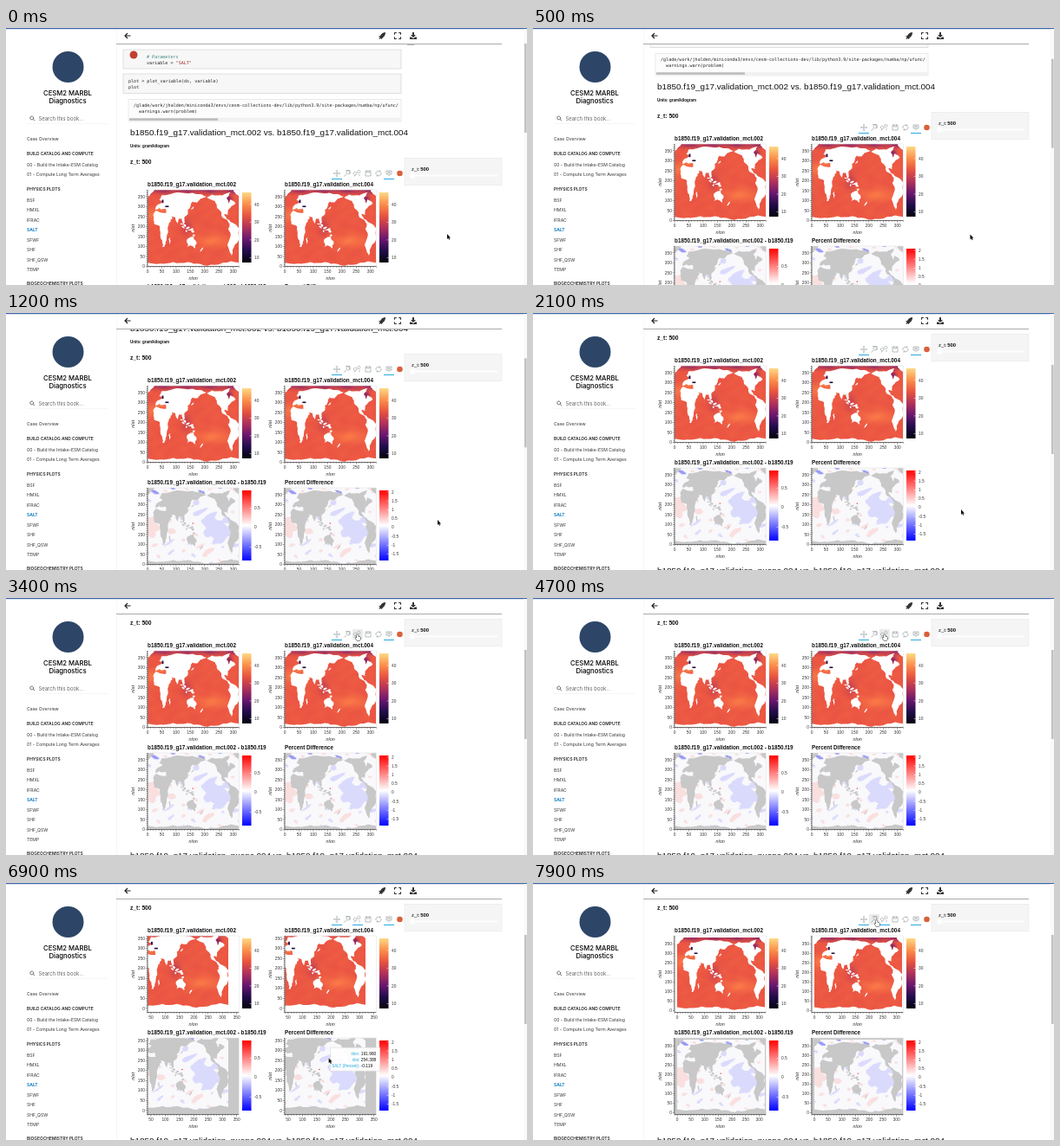
An HTML page with a canvas that plays this animation: 600x297 px, repeating every 8 s.

```html
<!DOCTYPE html>
<html lang="en">
<meta charset="utf-8">
<title>Diagnostics notebook</title>
<style>
  html, body { margin: 0; width: 100%; height: 100%; overflow: hidden; background: #fff; }
  canvas { display: block; }
</style>
<canvas id="stage" width="600" height="297"></canvas>
<script>
const c = document.getElementById('stage').getContext('2d');
const LOOP = 8000, STEP = 100;
const SANS = '"Liberation Sans", Arial, sans-serif';
const UI = 'Inter, sans-serif';
const MONO = '"DejaVu Sans Mono", monospace';
const BLUE = '#26aae1', GREY = '#c8c8c8';
const NLON = 320, NLAT = 384;

// Keyframes: [time, ...values], linear in between
const SCROLL = [[0, 0], [500, 53], [1200, 103], [1800, 126]];
const MOUSE = [[0, 508, 240], [1200, 497, 241], [2100, 493, 229], [3000, 405, 45],
  [5100, 405, 45], [6300, 371.66, 204.2], [7100, 371.66, 204.2], [7700, 396, 46]];
const PAN = [[6400, 0, 0], [6700, 38.0075, -20.27], [7100, 38.0075, -20.27], [7400, -10, -9]];
const ZOOM = [[7100, 1], [7400, 1.045]];
const WHEEL_ON = 4800;

function at(keys, t) {
  const i = keys.findIndex(k => k[0] > t);
  if (i === 0) return keys[0].slice(1);
  if (i < 0) return keys[keys.length - 1].slice(1);
  const a = keys[i - 1], b = keys[i], f = (t - a[0]) / (b[0] - a[0]);
  return a.slice(1).map((v, n) => v + (b[n + 1] - v) * f);
}

function text(s, x, y, size, { color = '#111', align = 'left', style = '', font = SANS } = {}) {
  c.font = `${style} ${size}px ${font}`;
  c.fillStyle = color;
  c.textAlign = align;
  c.fillText(s, x, y);
}
function rect(x, y, w, h, fill, line) {
  if (fill) { c.fillStyle = fill; c.fillRect(x, y, w, h); }
  if (line) { c.strokeStyle = line; c.lineWidth = 0.6; c.strokeRect(x, y, w, h); }
}
function disc(x, y, r, fill) {
  c.fillStyle = fill;
  c.beginPath();
  c.arc(x, y, r, 0, 7);
  c.fill();
}
function path(d, x, y, { fill, line, width = 1 }) {
  const p = new Path2D(d);
  c.save();
  c.translate(x, y);
  c.lineWidth = width;
  if (line) { c.strokeStyle = line; c.stroke(p); }
  if (fill) { c.fillStyle = fill; c.fill(p); }
  c.restore();
}

let seed = 7;
const rnd = () => (seed = seed * 16807 % 2147483647) / 2147483647;

// A coarse outline in grid units (y north), roughened by midpoint displacement
function coast(outline) {
  let pts = outline.split(' ').map(p => p.split(',').map(Number));
  for (let level = 0; level < 2; level++) {
    pts = pts.flatMap(([x, y], i) => {
      const [u, v] = pts[(i + 1) % pts.length], k = (rnd() - 0.5) * 0.26;
      return [[x, y], [(x + u) / 2 + (v - y) * k, (y + v) / 2 + (x - u) * k]];
    });
  }
  return `M${pts.join(' ')}Z`;
}
const CONTINENTS = {
  africa: '21,235 30,280 58,268 70,268 81,226 71,185 66,130 58,97 52,97 46,140 43,201 24,212',
  eurasia: '28,282 28,296 36,310 52,324 41,334 50,357 80,362 128,368 185,362 206,350 184,338 172,320 158,325 150,300 140,282 142,262 130,248 131,222 126,200 120,240 110,240 104,215 97,246 84,252 87,242 76,228 67,268 62,290 48,286 40,292',
  america: '208,345 225,360 262,356 290,372 276,342 284,316 290,336 308,316 284,286 282,258 269,262 276,240 290,224 322,188 322,152 306,110 294,53 288,70 289,145 282,190 288,212 262,245 244,292 236,326',
  australia: '137,128 150,148 162,150 172,118 166,90 150,106 138,96',
  madagascar: '74,135 80,145 76,110',
  japan: '152,285 163,305 160,291',
  newZealand: '184,72 194,95 189,78',
  greenlandEast: '300,390 308,364 322,345 330,390',
  greenlandWest: '-8,390 -2,345 12,366 25,390',
  antarctica: '-20,-120 -8,18 45,14 90,22 140,22 185,12 235,8 292,26 340,12 345,-120'
};
const LAND = new Path2D(Object.values(CONTINENTS).map(coast).join(''));
// Island arc from Sumatra past New Guinea
for (let i = 0; i < 12; i++) {
  const x = 121 + i * 3.7, y = 200 - i * 3.2 + (rnd() - 0.4) * 26;
  LAND.moveTo(x + 4, y);
  LAND.ellipse(x, y, 2 + rnd() * 4, 3 + rnd() * 7, rnd() * 3, 0, 6.3);
}

// Ocean fields, sampled once on a coarse grid
function field(color) {
  const cell = 4, k = document.createElement('canvas');
  k.width = NLON / cell;
  k.height = NLAT / cell;
  const g = k.getContext('2d');
  for (let y = 0; y < k.height; y++) for (let x = 0; x < k.width; x++) {
    g.fillStyle = color(x * cell, y * cell);
    g.fillRect(x, y, 1, 1);
  }
  return k;
}
const hill = (x, y, cx, cy, rx, ry) => Math.exp(-(((x - cx) / rx) ** 2) - ((y - cy) / ry) ** 2);
const ripple = (x, y) => Math.sin(x / 13 + 2 * Math.sin(y / 29)) * Math.cos(y / 17 + Math.sin(x / 23));

const SALINITY = field((x, y) => {
  const warm = hill(x, y, 228, 126, 50, 30) + hill(x, y, 15, 255, 24, 30) + hill(x, y, 48, 284, 16, 12) + 0.12 * ripple(x, y);
  const cold = Math.max(0, (y - 352) / 40) * (1 + 0.4 * ripple(x, y)) + 0.35 * hill(x, y, 135, 195, 18, 40) + hill(x, y, 282, 335, 12, 18);
  return `rgb(${236 + 14 * warm - 100 * cold}, ${88 + 32 * warm - 55 * cold}, ${67 + 4 * warm + 32 * cold})`;
});
const DIFFERENCE = field((x, y) => {
  const r = ripple(x, y);
  if (y > 350 && r < -0.75) return '#9a9af6';
  const v = hill(x, y, 20, 190, 24, 55) + 0.6 * hill(x, y, 90, 170, 14, 22) + 0.6 * hill(x, y, 225, 70, 40, 18)
    - 1.2 * hill(x, y, 235 + (190 - y) * 0.3, 190, 38, 90) + 0.52 * r;
  return v > 0.45 ? '#fadfdf' : v < -0.45 ? '#dadafd' : '#f9f8fb';
});

// Evenly spaced colours from top to bottom
function ramp(y, h, colors) {
  const g = c.createLinearGradient(0, y, 0, y + h);
  colors.forEach((col, i) => g.addColorStop(i / (colors.length - 1), col));
  return g;
}
const HEAT = ['#fdd985', '#fb8f4a', '#e8533f', '#b0325a', '#6a176e', '#220c4a', '#04030d'];
const BWR = ['#f00', '#fff', '#00f'];

const W = 105.3, H = 88.5, RUN = 'b1850.f19_g17.validation_mct.';
// bar: value at the top, value at the bottom, step between labels
const PLOTS = [
  { x: 163, y: 187, title: RUN + '002', bar: [46.8, 7.3, 10] },
  { x: 321, y: 187, title: RUN + '004', bar: [46.8, 7.3, 10] },
  { x: 163, y: 305, title: RUN + '002 - b1850.f19', bar: [0.95, -0.85, 0.5], diff: true },
  { x: 321, y: 305, title: 'Percent Difference', bar: [2.09, -1.87, 0.5], diff: true }
];

// Calls fn(value) for every multiple of step in the range
function ticks(from, to, step, fn) {
  for (let i = Math.ceil(from / step); i * step <= to; i++) fn(i * step);
}

function plot({ x, y, diff, title, bar }, [x0, x1, y0, y1]) {
  const sx = W / (x1 - x0), sy = H / (y1 - y0), bottom = y + H;
  const back = diff ? GREY : '#fff', label = { color: '#333' };
  text(title, x, y - 4.2, 6.35, { style: 'bold' });
  c.save();
  c.beginPath();
  c.rect(x, y, W, H);
  c.clip();
  rect(x, y, W, H, back);
  c.translate(x - x0 * sx, bottom + y0 * sy);
  c.scale(sx, -sy);
  c.drawImage(diff ? DIFFERENCE : SALINITY, 0, 0, NLON, NLAT);
  c.fillStyle = back;
  c.fill(LAND);
  if (diff) rect(157, 203, 4, 5, '#e33');
  else {
    rect(62, 297, 12, 7, '#1b0b3f');
    rect(50, 318, 6, 16, '#30104f');
  }
  c.restore();
  rect(x, y, W, H, null, '#e5e5e5');
  path(`M0 0V${H}H${W}`, x, y, { line: '#222', width: 0.6 });

  ticks(x0, x1, 10, v => {
    const px = x + (v - x0) * sx, major = v % 50 === 0;
    rect(px - 0.25, bottom, 0.5, major ? 2.2 : 1.2, '#333');
    if (major) text(v, px, bottom + 7.4, 4.8, { ...label, align: 'center' });
  });
  ticks(y0, y1, 10, v => {
    const py = bottom - (v - y0) * sy, major = v % 50 === 0, len = major ? 2.2 : 1.2;
    rect(x - len, py - 0.25, len, 0.5, '#333');
    if (major) text(v, x - 3.2, py + 1.7, 4.8, { ...label, align: 'right' });
  });
  const axis = { ...label, style: 'italic', align: 'center' };
  text('nlon', x + W / 2, bottom + 15.5, 5.5, axis);
  c.save();
  c.translate(x - 15.5, y + H / 2);
  c.rotate(-Math.PI / 2);
  text('nlat', 0, 0, 5.5, axis);
  c.restore();

  const top = y + 3, len = 81, [hi, lo, step] = bar;
  rect(x + 109, top, 10.5, len, ramp(top, len, diff ? BWR : HEAT));
  ticks(lo, hi, step, v => {
    const py = top + (hi - v) / (hi - lo) * len;
    rect(x + 117.5, py - 0.25, 2, 0.5, '#fff');
    text(v, x + 123, py + 1.7, 4.8, label);
  });
}

const ICONS = [
  'M-3.5 0H3.5M0-3.5V3.5M-1-2.5L0-3.5 1-2.5M-1 2.5L0 3.5 1 2.5M-2.5-1L-3.5 0-2.5 1M2.5-1L3.5 0 2.5 1',
  'M-2-3.5H3V1M3-1A2 2 0 1 1 3-1.1M-1 1L-3.5 3.5',
  'M-1 0A1.8 1.8 0 1 1-1-.1M3-2A1.6 1.6 0 1 1 3-2.1M-3 2L-4 3.5M2 1V3',
  'M-3-3H3V3H-3ZM-1.5-3V-1H1.5V-3',
  'M-3 1A3 3 0 0 1 2-2M3-1A3 3 0 0 1-2 2M2-3.5V-2H.5M-2 3.5V2H-.5',
  'M-3-3H3V1H1L0 2.5-1 1H-3ZM-1.5-1.5H1.5M-1.5-.2H1.5'
];
function toolbar(t, mx, my) {
  ICONS.forEach((d, i) => {
    const x = 381 + 12 * i;
    if (Math.abs(mx - x) < 6 && Math.abs(my - 168) < 7) rect(x - 6, 162, 12, 12, '#ebebeb');
    path(d, x, 168, { line: '#a1a6a9', width: 0.75 });
    if (i === 0 || i === 5 || (i === 2 && t >= WHEEL_ON)) rect(x - 6, 174, 12, 1, BLUE);
  });
  disc(453.5, 168, 3.3, '#d9603b');
}

function code(s, x, y, opt = {}) { text(s, x, y, 5.07, { font: MONO, color: '#222', ...opt }); }

function page(t, view, mx, my) {
  rect(462, 18, 8, 1.6, '#888');
  rect(135, 25, 320, 22, '#f7f7f7', '#ccc');
  disc(147, 31, 4.5, '#c0402f');
  code('# Parameters', 162, 35, { style: 'italic', color: '#408080' });
  code('variable = ', 162, 41.8);
  code('"SALT"', 195.6, 41.8, { color: '#a02828' });
  rect(135, 53, 320, 22.5, '#f7f7f7', '#ccc');
  code('plot = plot_variable(ds, variable)', 141, 63);
  code('plot', 141, 69.6);
  rect(141, 82.5, 314, 25.5, '#fcfcfc', '#ddd');
  code('/glade/work/jhalden/miniconda3/envs/cesm-collections-dev/lib/python3.9/site-packages/numba/np/ufunc/', 147, 91);
  code('  warnings.warn(problem)', 147, 97.6);
  rect(141, 103.8, 314, 3.8, '#f1f1f1');
  rect(142, 104.3, 102, 2.6, '#bdbdbd');

  text(`${RUN}002 vs. ${RUN}004`, 143, 124.3, 9.9);
  text('Units: gram/kilogram', 143, 137.7, 4.5, { style: 'bold' });
  text('z_t: 500', 143, 157.2, 6.7, { style: 'bold' });

  rect(459, 150.3, 112, 31.5, '#f5f5f5', '#e6e6e6');
  text('z_t: ', 467, 164.6, 5.9);
  text('500', 477.2, 164.6, 5.9, { style: 'bold' });
  rect(467, 169.5, 99, 2, '#fdfdfd');
  rect(465.5, 167.5, 5, 6, '#fff');

  toolbar(t, mx, my);
  PLOTS.forEach(p => plot(p, view));
  text(`b1850.f19_g17.validation_nuopc.004 vs. ${RUN}004`, 143, 427, 9.9);
}

function tooltip(view, mx, my) {
  const p = PLOTS.find(q => mx > q.x && mx < q.x + W && my > q.y && my < q.y + H);
  if (!p) return;
  const lon = view[0] + (mx - p.x) / W * (view[1] - view[0]);
  const lat = view[2] + (p.y + H - my) / H * (view[3] - view[2]);
  const drift = (lon - 191.96) / 900;
  const rows = [['nlon:', lon], ['nlat:', lat], p.diff ? ['SALT (Percent):', drift - 0.119] : ['SALT:', drift + 34.9]];
  rect(mx + 2, my - 14, 57, 27, 'rgba(255,255,255,.93)', '#ddd');
  rows.forEach(([k, v], i) => {
    const y = my - 5 + i * 7;
    text(k, mx + 35.5, y, 4.5, { color: BLUE, align: 'right' });
    text(v.toFixed(3), mx + 37, y, 4.9);
  });
}

const MENU = [
  [147.3, 'BUILD CATALOG AND COMPUTE', '00 - Build the Intake-ESM Catalog', '01 - Compute Long Term Averages'],
  [188.3, 'PHYSICS PLOTS', 'BSF', 'HMXL', 'IFRAC', 'SALT', 'SFWF', 'SHF', 'SHF_QSW', 'TEMP'],
  [297, 'BIOGEOCHEMISTRY PLOTS']
];
function sidebar() {
  rect(0, 0, 127, 297, '#fff');
  rect(127, 0, 0.6, 297, '#eee');
  disc(71.5, 45, 18, '#2d4668');
  const ui = (s, x, y, size, o) => text(s, x, y, size, { font: UI, color: '#333', ...o });
  const name = { align: 'center', color: '#000', style: '500' };
  ui('CESM2 MARBL', 71, 78.4, 7.7, name);
  ui('Diagnostics', 71, 87.4, 7.7, name);
  path('M1.6 0A1.9 1.9 0 1 1 1.6-.1M1.2 1.4L3 3.2', 30, 104, { line: '#444', width: 0.8 });
  ui('Search this book...', 37.5, 106.7, 5.9, { color: '#666' });
  rect(24, 110.5, 94, 0.5, '#eee');
  ui('Case Overview', 24, 130.3, 5.15);
  for (const [y, title, ...items] of MENU) {
    ui(title, 24, y, 4.9, { style: '600', color: '#222' });
    items.forEach((s, i) => ui(s, 24, y + 12.4 + i * 11.47, 5.1,
      s === 'SALT' ? { color: '#0071bc', style: '600' } : {}));
  }
}

function header(scroll) {
  rect(127.6, 0, 470, 18, '#fff');
  rect(127, 18, 444, 1, '#aaa');
  path('M3.5 0H-3M0-3L-3 0 0 3', 140, 9, { line: '#222', width: 1.2 });
  path('M4-4Q0-4-2 0L-4 .5-2.5 1.5-3.5 4-1 3-.5 4.2 1 2Q4 0 4-4Z', 433, 9, { fill: '#333' });
  path('M-3.5-1.2V-3.5H-1.2M1.2-3.5H3.5V-1.2M3.5 1.2V3.5H1.2M-1.2 3.5H-3.5V1.2', 451, 9, { line: '#333', width: 1.1 });
  path('M-1-4H1V-1H3L0 2-3-1H-1ZM-4 1.5H-2L0 3.2 2 1.5H4V4H-4Z', 469, 9, { fill: '#333' });
  rect(0, 0, 600, 1.2, '#3d66a8');
  rect(596, 1.2, 4, 296, '#fafafa');
  rect(597, 18 + scroll / 3, 2.6, 103, '#c1c1c1');
}

function pointer(x, y) {
  const hand = Math.abs(y - 45) < 8 && x > 375 && x < 447;
  if (hand) path('M-1-2.5Q0-3.5.6-2.4V-.4L3 .2Q3.6 2.4 2.4 4.2H-.8L-2.8 1-1 1Z', x, y, { fill: '#fff', line: '#222' });
  else path('M0-2V4L1.3 2.8 2.2 4.8 3.2 4.3 2.3 2.4H4Z', x, y, { fill: '#111', line: '#fff' });
}

function draw(now) {
  const t = Math.floor(now % LOOP / STEP) * STEP;
  const [scroll] = at(SCROLL, t), [mx, my] = at(MOUSE, t);
  const [px, py] = at(PAN, t), [zoom] = at(ZOOM, t);
  const view = [px, px + NLON * zoom, py, py + NLAT * zoom];
  rect(0, 0, 600, 297, '#fff');
  c.save();
  c.translate(0, -scroll);
  page(t, view, mx, my + scroll);
  tooltip(view, mx, my + scroll);
  c.restore();
  sidebar();
  header(scroll);
  pointer(mx, my);
}

const start = performance.now();
(function tick() {
  draw(performance.now() - start);
  requestAnimationFrame(tick);
})();
</script>
</html>
```
